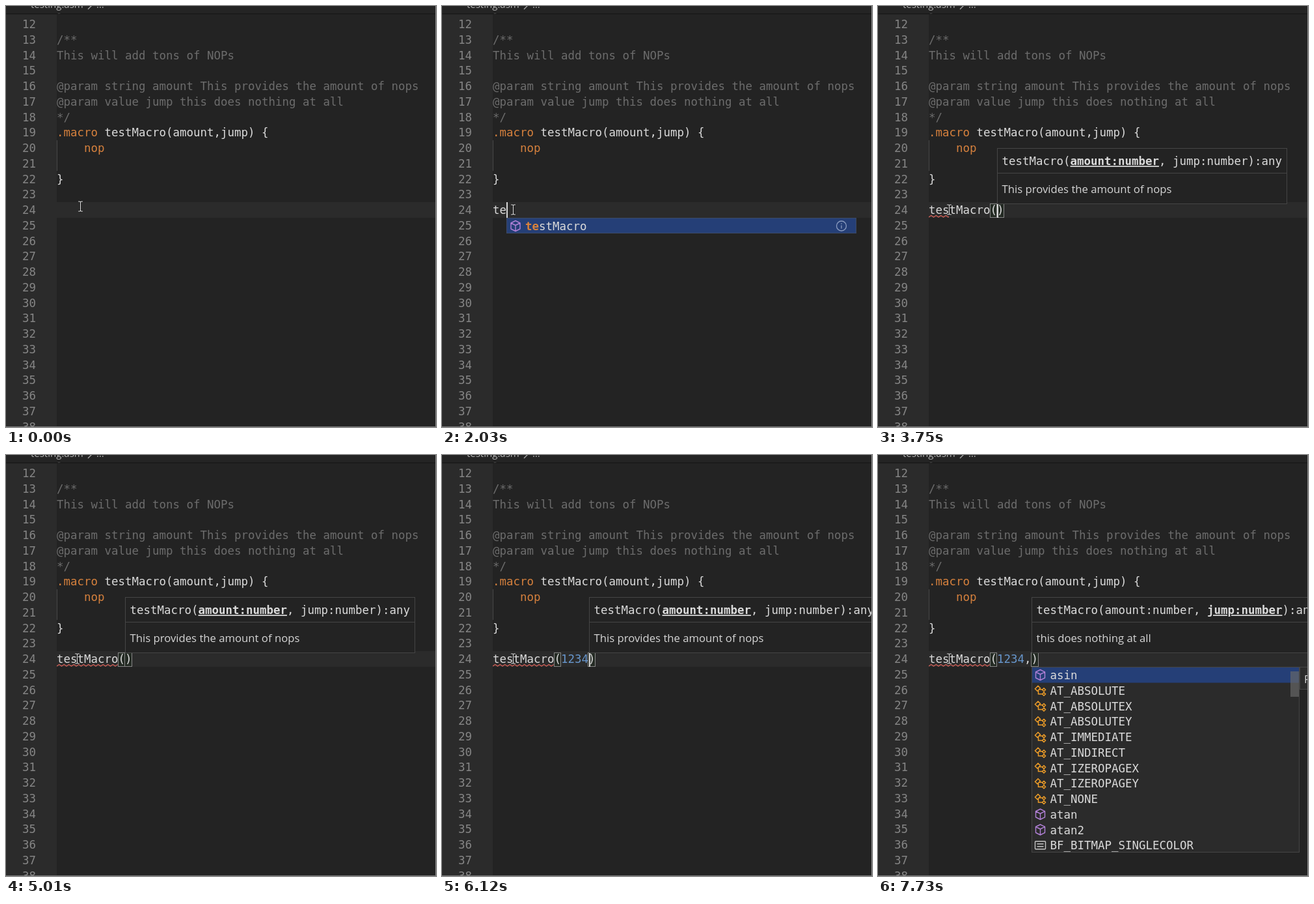
An HTML page that plays this animation: 661 px wide and 646 px high, repeating every 8000 ms.

```html
<!DOCTYPE html>
<html lang="en">
<head>
<meta charset="utf-8">
<title>Macro completion</title>
<style>
  html, body { margin: 0; width: 100%; height: 100%; overflow: hidden; background: #232323; }
  svg { display: block; width: 661px; height: 646px; }
  text { white-space: pre; }
  .mono { font: 17.44px "DejaVu Sans Mono", monospace; fill: #dadada; }
  .ui { font: 16.7px "Open Sans", sans-serif; fill: #d6d6d6; }
  .mono .path { font-size: 15px; fill: #b0b0b0; }
  .mono .num { fill: #6796cc; }
  .mono .key { fill: #d5803d; }
  .mono .note { fill: #6c6c6c; }
  .mono .line { fill: #858585; }
  .hit { fill: #d9823b; font-weight: bold; }
  .on { font-weight: bold; text-decoration: underline; }
  .box { fill: #2b2b2b; stroke: #454545; }
  .tip { fill: #232323; stroke: #454545; }
  .row { fill: #253f77; }
  .cube { fill: none; stroke: #b180d7; stroke-width: 1.4; stroke-linejoin: round; }
  .enum { fill: none; stroke: #ee9d28; stroke-width: 1.5; }
  .const { fill: none; stroke: #c5c5c5; stroke-width: 1.4; }
  .pair { fill: #242b24; stroke: #858585; }
  .wave { fill: none; stroke: #d9625a; stroke-width: 1.2; }
</style>
</head>
<body>
<svg id="stage" viewBox="0 0 661 646" xmlns="http://www.w3.org/2000/svg"></svg>
<script>
const LEFT = 78, CELL = 10.5, ROW = 23.75, LOOP = 8000;
const baseline = n => 319.2 + (n - 24) * ROW;
const colX = c => LEFT + c * CELL;
const caretX = c => Math.round(LEFT + 1.25 * Math.ceil(8.4 * c));
const rect = (x, y, w, h, fill, more = '') =>
  `<rect x="${x}" y="${y}" width="${w}" height="${h}" fill="${fill}" ${more}/>`;
const box = (x, y, w, h, cls = 'box') =>
  `<rect class="${cls}" x="${x + .5}" y="${y + .5}" width="${w - 1}" height="${h - 1}"/>`;
const text = (x, y, s, cls = '') => `<text x="${x}" y="${y}" class="${cls}">${s}</text>`;
const span = (cls, s) => `<tspan class="${cls}">${s}</tspan>`;

const icons = {
  cube: 'M0-8L7-4.5V4.5L0 8L-7 4.5V-4.5ZM-7-4.5L0-1L7-4.5M0-1V8',
  enum: 'M-8-2.5L-3.5-7L0-3.5L-4.5 1ZM-2-1.5H3M-3 0V5.5H3M3-1L5.5-3.5L8-1L5.5 1.5ZM3 5.5L5.5 3L8 5.5L5.5 8Z',
  const: 'M-7-6H7Q8-6 8-5V5Q8 6 7 6H-7Q-8 6-8 5V-5Q-8-6-7-6ZM-5-2H5M-5 2H5'
};
const icon = (kind, x, y) => `<path class="${kind}" d="${icons[kind]}" transform="translate(${x} ${y})"/>`;

const code = {
  11: '}',
  13: span('note', '/**'),
  14: span('note', 'This will add tons of NOPs'),
  16: span('note', '@param string amount This provides the amount of nops'),
  17: span('note', '@param value jump this does nothing at all'),
  18: span('note', '*/'),
  19: span('key', '.macro') + ' testMacro(amount,jump) {',
  20: '    ' + span('key', 'nop'),
  22: '}'
};
const items = ['asin', ...['ABSOLUTE', 'ABSOLUTEX', 'ABSOLUTEY', 'IMMEDIATE', 'INDIRECT',
  'IZEROPAGEX', 'IZEROPAGEY', 'NONE'].map(s => 'AT_' + s), 'atan', 'atan2', 'BF_BITMAP_SINGLECOLOR'];
const kindOf = s => s.startsWith('AT') ? 'enum' : s.startsWith('BF') ? 'const' : 'cube';

function editor() {
  let s = rect(0, 0, 661, 646, '#232323') + rect(0, 12, LEFT, 634, '#2b2b2b') +
    rect(LEFT, 301, 583, 24, '#2b2b2b') + rect(78, 206, 1, 47, '#484848');
  for (let n = 12; n <= 38; n++) s += text(25, baseline(n), n, 'line');
  for (const n in code) s += text(LEFT, baseline(n), code[n]);
  return s + rect(0, 0, 661, 11, '#242424') + rect(0, 11, 661, 2, '#191919', 'opacity=".8"') +
    text(38, 3, 'testing.asm', 'ui path') + text(139, 3, '…', 'ui path') +
    '<path d="M126-5L131 0L126 5" fill="none" stroke="#aaa" stroke-width="1.3"/>';
}

function wave() {
  let d = 'M0 324';
  for (let x = 3.75, up = true; x < 96; x += 3.75, up = !up) d += `L${x} ${up ? 321.5 : 324}`;
  return `<svg id="wave" x="${LEFT}" y="0" height="646"><path class="wave" d="${d}"/></svg>`;
}

const hint = `<g id="hint">${box(0, 218, 446, 86, 'tip')}${rect(1, 256, 444, 1, '#454545')}
  <text x="7.5" y="244.2">testMacro(<tspan id="p0">amount:number</tspan>, <tspan id="p1">jump:number</tspan>):any</text>
  <text x="7.5" y="287" class="ui" id="about"></text></g>`;

const single = `<g id="single"><rect id="bar" class="row" x=".5" y="325.5" height="23" stroke="#3c4a68"/>
  ${icon('cube', 14, 337.5)}<text x="29" y="344"><tspan class="hit" id="hit"></tspan><tspan id="rest"></tspan></text>
  <g id="info" fill="none" stroke="#8b9cc0" stroke-width="1.3"><circle cx="515" cy="337.5" r="7.5"/>
  <path d="M515 336.5V341.5M515 333.2V334.8"/></g>
  <g id="docs">${box(412, 325, 300, 122)}${['This will add tons of NOPs', '@param string amount This provides the amount',
    'of nops @param value jump this does nothing at', 'all'].map((s, i) => text(419.5, [349.7, 389.7, 412.8, 436][i], s, 'ui')).join('')}</g></g>`;

const list = `<g id="list">${box(236, 325, 412, 285)}${rect(237, 326, 410, 23.5, '#253f77')}
  ${rect(634, 332, 13, 39, '#6a6a6a', 'opacity=".65"')}
  ${items.map((s, i) => icon(kindOf(s), 249.5, 337.5 + i * ROW) + text(264.5, 344 + i * ROW, s)).join('')}
  <g id="side">${box(648, 325, 40, 35)}${text(655, 349.7, 'F', 'ui')}</g></g>`;

const beam = 'M-3.5-7.5H-1L0-6.5L1-7.5H3.5M0-6.5V6.5M-3.5 7.5H-1L0 6.5L1 7.5H3.5';

const stage = document.getElementById('stage');
stage.innerHTML = `<g class="mono">${editor()}
  <g id="pairs">${box(172, 303, 11, 22, 'pair')}<g id="end">${box(-1, 303, 12, 22, 'pair')}</g></g>
  <text x="${LEFT}" y="${baseline(24)}"><tspan id="name"></tspan><tspan id="num" class="num"></tspan><tspan id="tail"></tspan></text>
  ${wave()}${rect(0, 301, 2, 24, '#d6d6d6', 'id="caret"')}${hint}${single}${list}</g>
  ${rect(660, 0, 1, 646, '#858585')}${rect(0, 645, 661, 1, '#757575')}
  <g id="mouse" fill="none"><path d="${beam}" stroke="#111" stroke-width="2.4"/>
  <path d="${beam}" stroke="#e4e4e4" stroke-width="1.1"/></g>`;

const ui = {};
stage.querySelectorAll('[id]').forEach(e => ui[e.id] = e);

// Each entry changes only the listed fields, from its time on.
const start = { name: '', num: '', tail: '', col: 0, caret: 0, wave: 0, pairs: 0,
  hint: 0, arg: 0, single: 0, docs: 0, list: 0, side: 0 };
const cues = [
  [1140, { caret: 1 }],
  [1600, { caret: 0 }],
  [2030, { name: 'te', col: 2, caret: 1, single: 1 }],
  [2090, { docs: 1 }],
  [2460, { name: 'tes', col: 3 }],
  [2890, { caret: 0 }],
  [3390, { caret: 1 }],
  [3470, { name: 'testMacro(', tail: ')', col: 10, single: 0 }],
  [3560, { pairs: 1 }],
  [3750, { hint: 183, wave: 31 }],
  [4000, { caret: 0 }],
  [4460, { caret: 1 }],
  [4830, { wave: 94 }],
  [5010, { caret: 0 }],
  [5420, { num: '1', col: 11, caret: 1 }],
  [5510, { hint: 196 }],
  [5600, { num: '12', col: 12 }],
  [5690, { hint: 204 }],
  [5780, { num: '123', col: 13 }],
  [5870, { hint: 216 }],
  [6030, { num: '1234', col: 14 }],
  [6120, { hint: 226 }],
  [6570, { caret: 0 }],
  [7010, { caret: 1 }],
  [7280, { tail: ',)', col: 15 }],
  [7370, { hint: 236, arg: 1, list: 1 }],
  [7460, { side: 1 }],
  [7730, { caret: 0 }]
];
const moves = [220, 290, 370, 440, 510];

const show = (e, on) => e.style.display = on ? '' : 'none';
const shift = (e, x, y = 0) => e.setAttribute('transform', `translate(${x} ${y})`);
const put = (e, s) => { if (e.textContent !== s) e.textContent = s; };

function draw(t) {
  const s = Object.assign({}, start, ...cues.filter(c => c[0] <= t).map(c => c[1]));
  const x = caretX(s.col);
  for (const id of ['name', 'num', 'tail']) put(ui[id], s[id]);
  for (const id of ['caret', 'pairs', 'hint', 'single', 'docs', 'list', 'side', 'wave']) show(ui[id], s[id]);
  ui.caret.setAttribute('x', x);
  ui.caret.setAttribute('y', s.hint ? 304 : 301);
  ui.caret.setAttribute('height', s.hint ? 21 : 24);
  ui.wave.setAttribute('width', s.wave);
  shift(ui.end, Math.round(colX(s.col)));

  shift(ui.hint, s.hint);
  ui.p0.setAttribute('class', s.arg ? '' : 'on');
  ui.p1.setAttribute('class', s.arg ? 'on' : '');
  put(ui.about, s.arg ? 'this does nothing at all' : 'This provides the amount of nops');

  shift(ui.single, x);
  show(ui.info, !s.docs);
  ui.bar.setAttribute('width', s.docs ? 411 : 537);
  put(ui.hit, s.name);
  put(ui.rest, 'testMacro'.slice(s.name.length));

  const step = moves.filter(m => m <= t).length;
  shift(ui.mouse, 114.5 - step, 307.5 + step);
}

function tick() {
  draw(performance.now() % LOOP);
  requestAnimationFrame(tick);
}
tick();
</script>
</body>
</html>
```
